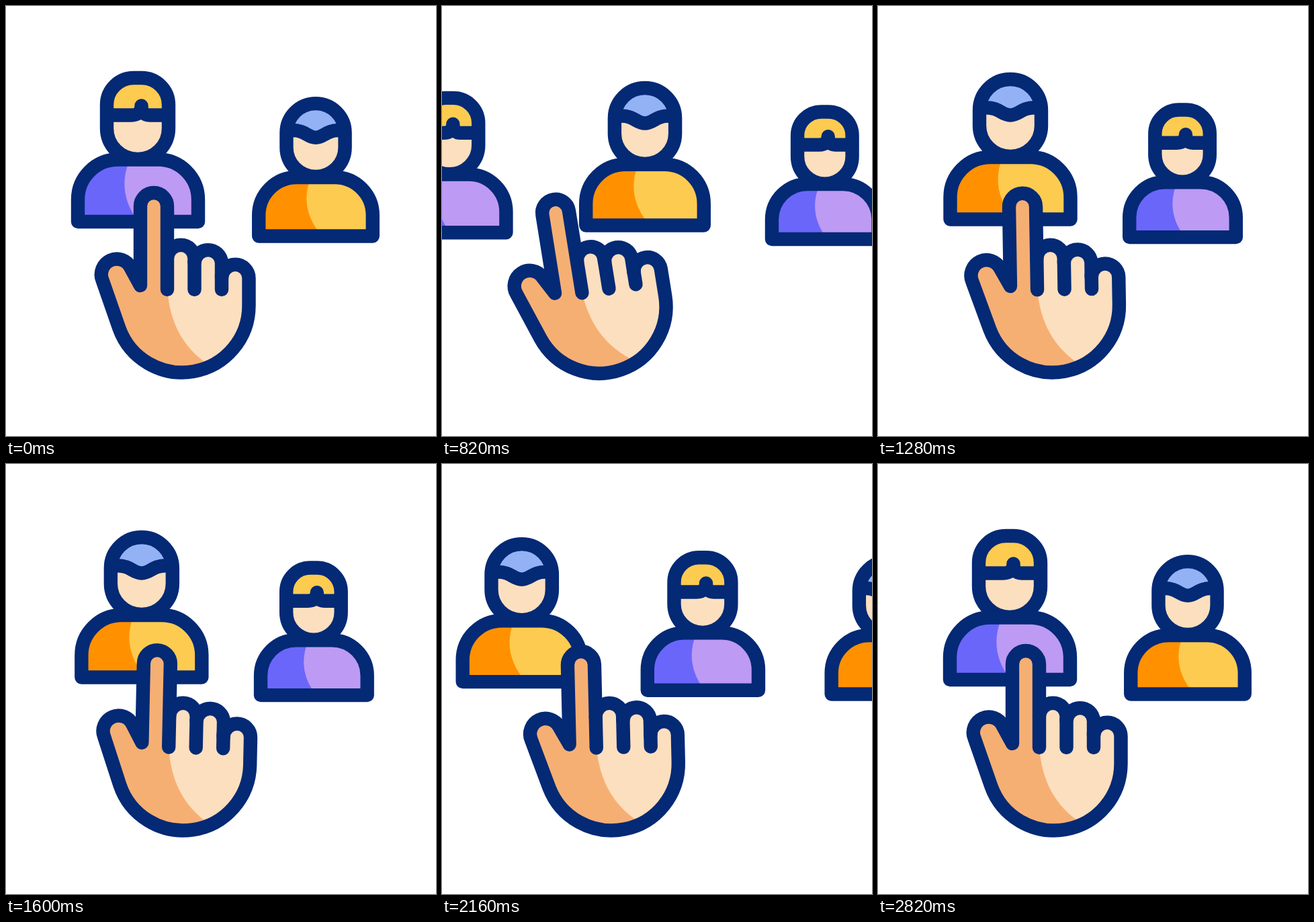
An HTML page with a canvas that plays this animation: 640x640 px, repeating every 3020 ms.

```html
<!DOCTYPE html>
<html lang="en">
<head>
<meta charset="utf-8">
<title>Swipe through people</title>
<style>
html, body { margin: 0; width: 100%; height: 100%; overflow: hidden; background: #fff; }
canvas { display: block; width: 100%; height: 100%; }
</style>
</head>
<body>
<canvas id="stage" width="640" height="640"></canvas>
<script>
const ctx = document.getElementById('stage').getContext('2d');

const LOOP = 3020, HALF = 1500, LINE = 20.4;
const NAVY = '#042975', SKIN = '#fcdfbe', TAN = '#f6af73', YELLOW = '#fdcb50';
const HAND = { x: 262, y: 446, windup: 6.6, swing: -18 };

const lerp = (a, b, k) => a + (b - a) * k;

// sine ease-in-out between two moments
function ease(t, from, to) {
  const u = Math.min(1, Math.max(0, (t - from) / (to - from)));
  return (1 - Math.cos(Math.PI * u)) / 2;
}

// Person shapes: origin is the bottom centre of the body outline.
const body = new Path2D(
  'M-89.5 -10V-43A59.5 59.5 0 0 1 -30 -102.5H30A59.5 59.5 0 0 1 89.5 -43V-10Z');

const people = [
  {
    dark: '#6b66fa', light: '#bd9af3', hair: YELLOW,
    head: new Path2D('M-46.5 -149V-184A40 40 0 0 1 -6.5 -224H5.5A40 40 0 0 1 45.5 -184V-149A46 46 0 0 1 -46.5 -149Z'),
    top: new Path2D('M-46.5 -168.5V-184A40 40 0 0 1 -6.5 -224H5.5A40 40 0 0 1 45.5 -184V-168.5Z'),
    fringe: new Path2D('M-46 -168.5H-10.5Q5 -168.5 5 -182.5Q5 -168.5 17.5 -168.5H45'),
    shine: new Path2D('M-12 -102.5C-26 -72 -22 -38 1 -10H120V-102.5Z'),
    enter: { x: 776, y: 361, s: .886, cut: 3 },
    right: { x: 453.5, y: 353, s: .886, cut: 3 },
    left: { x: 196.5, y: 331, s: 1, cut: 0 },
    exit: { x: -108, y: 355.5, s: .9, cut: 0 }
  },
  {
    dark: '#ff9100', light: YELLOW, hair: '#93b2f6',
    head: new Path2D('M-46 -172.5A46 46 0 0 1 46 -172.5V-149.5A46 46 0 0 1 -46 -149.5Z'),
    top: new Path2D('M-46 -172.5A46 46 0 0 1 46 -172.5L36 -176.3C16 -176.3 13 -165 0 -165C-13 -165 -16 -176.3 -36 -176.3Z'),
    fringe: new Path2D('M-40 -176.3H-36C-16 -176.3 -13 -165 0 -165C13 -165 16 -176.3 36 -176.3H40'),
    shine: new Path2D('M-12 -102.5C-25 -72 -20 -38 6 -10H120V-102.5Z'),
    enter: { x: 761, y: 352, s: .947, cut: 4.5 },
    right: { x: 461, y: 352, s: .947, cut: 4.5 },
    left: { x: 197, y: 327.5, s: 1, cut: .5 },
    exit: { x: -101, y: 347.5, s: .947, cut: .5 }
  }
];

const hand = new Path2D(
  'M200 416L185.5 389.5A23 23 0 0 0 143.5 408.2L168.3 479.4' +
  'A99.5 99.5 0 0 0 361.5 446V405A20.25 20.25 0 0 0 321 405V382' +
  'A20.3 20.3 0 0 0 280.5 382V376A20.2 20.2 0 0 0 240 376V298' +
  'A20 20 0 0 0 200 298Z');
const creases = new Path2D('M240 376V422M280.5 380V422M321 400V422');
const handShade = new Path2D('M240 260V422C244 470 262 508 303 535V570H100V260Z');

function fill(path, color) {
  ctx.fillStyle = color;
  ctx.fill(path);
}

function drawPerson(p, from, to, k, shift) {
  const s = lerp(from.s, to.s, k);
  ctx.save();
  ctx.translate(lerp(from.x + shift, to.x, k), lerp(from.y, to.y, k));
  ctx.scale(s, s);
  ctx.lineWidth = LINE / s; // outlines keep their weight at any size

  fill(p.head, SKIN);
  fill(p.top, p.hair);
  ctx.stroke(p.fringe);
  ctx.stroke(p.head);

  fill(body, p.dark);
  ctx.save();
  ctx.clip(body);
  ctx.translate(lerp(from.cut, to.cut, k), 0);
  fill(p.shine, p.light);
  ctx.restore();
  ctx.stroke(body);
  ctx.restore();
}

function drawHand(windup, sweep, back) {
  const angle = lerp(lerp(HAND.windup * windup, HAND.swing, sweep), 0, back);
  const dx = lerp(lerp(9 * windup, -49, sweep), 0, back);
  const dy = 5.2 * (angle / HAND.swing) ** 2;
  ctx.save();
  ctx.translate(HAND.x + dx, HAND.y + dy);
  ctx.rotate(angle * Math.PI / 180);
  ctx.translate(-HAND.x, -HAND.y);

  fill(hand, SKIN);
  ctx.save();
  ctx.clip(hand);
  fill(handShade, TAN);
  ctx.restore();
  ctx.stroke(hand);
  ctx.stroke(creases);
  ctx.restore();
}

function draw(time) {
  const turn = time < HALF ? 0 : 1;
  const t = time - turn * HALF;
  const windup = ease(t, 0, 355);
  const sweep = ease(t, 361, 1142);
  const back = ease(t, 1130, 1307);
  const first = people[turn], next = people[1 - turn];
  const shift = 26 * windup;

  ctx.fillStyle = '#fff';
  ctx.fillRect(0, 0, 640, 640);
  ctx.strokeStyle = NAVY;
  ctx.lineWidth = LINE;
  ctx.lineCap = ctx.lineJoin = 'round';

  drawPerson(first, first.left, first.exit, sweep, shift);
  drawPerson(next, next.right, next.left, sweep, shift);
  drawPerson(first, first.enter, first.right, sweep, 0);
  drawHand(windup, sweep, back);
}

const start = performance.now();
function tick() {
  draw((performance.now() - start) % LOOP);
  requestAnimationFrame(tick);
}
tick();
</script>
</body>
</html>
```
